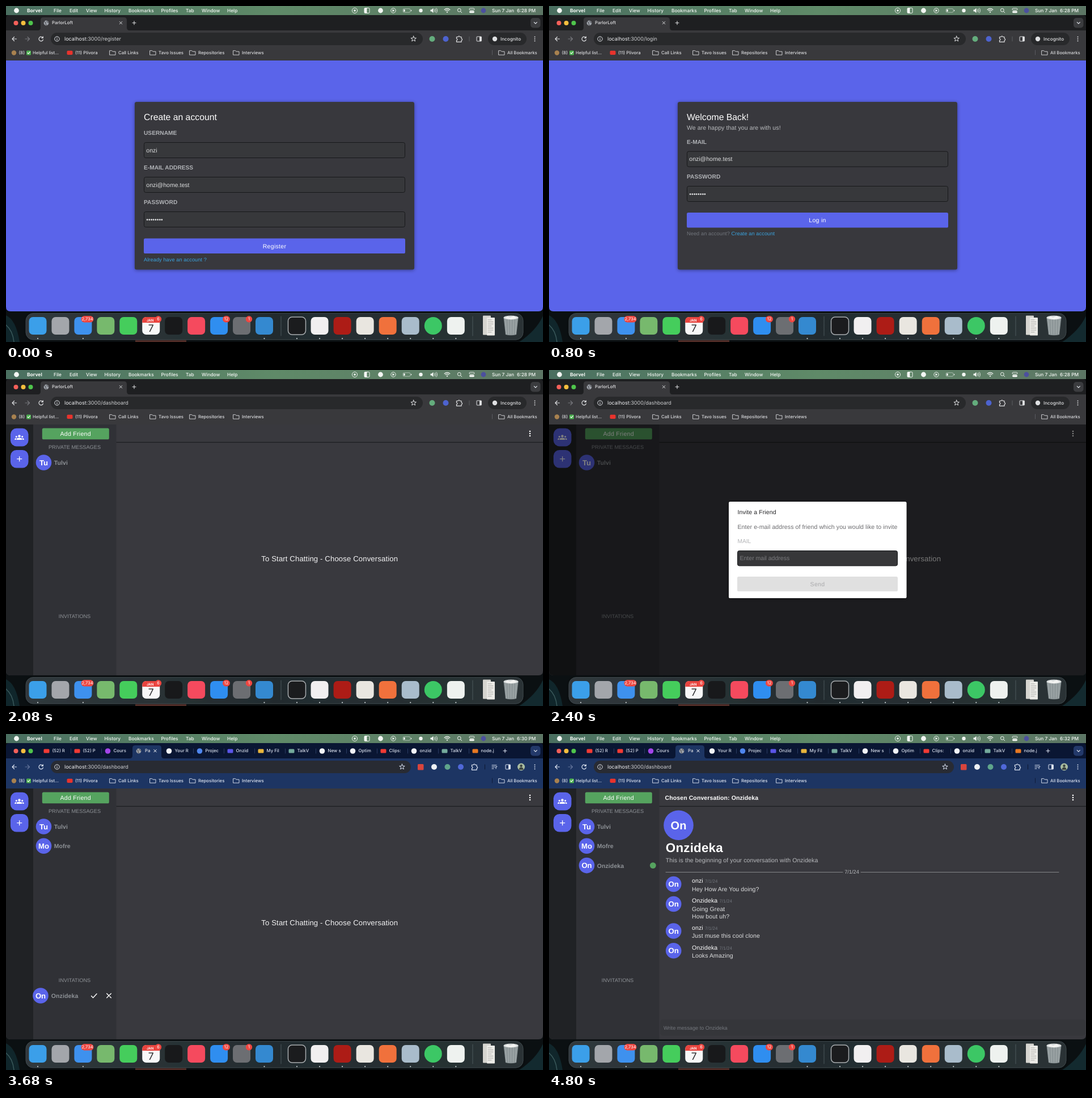
Write an HTML page that moves like this. It is 947 px wide and 592 px high and loops after 5.6 s.

```html
<!DOCTYPE html>
<html lang="en">
<head>
<meta charset="utf-8">
<title>Chat app walkthrough</title>
<style>
  html, body { margin: 0; width: 100%; height: 100%; overflow: hidden; background: #0b1012; }
  svg { display: block; width: 947px; height: 592px; }
  text { font-family: "Liberation Sans", Arial, sans-serif; text-rendering: geometricPrecision; white-space: pre; }
  .ui { font-family: Inter, sans-serif; }
  .body { letter-spacing: .00938em; }
  .btn { letter-spacing: .02857em; }
  .mid { text-anchor: middle; }
  .bold { font-weight: 700; }
  .semi { font-weight: 600; }
  .med { font-weight: 500; }
  .line { fill: none; stroke-linecap: round; stroke-linejoin: round; }
  .scene { visibility: hidden; animation: show 5.6s step-end calc(var(--i) * .8s - 5.6s) infinite; }
  @keyframes show {
    0% { visibility: visible; }
    14.2857%, 100% { visibility: hidden; }
  }
</style>
</head>
<body>
<svg id="stage" viewBox="0 0 947 592">
  <defs>
    <linearGradient id="bar">
      <stop offset="0" stop-color="#4a6f60"/><stop offset=".5" stop-color="#5f8a68"/><stop offset="1" stop-color="#5c7564"/>
    </linearGradient>
    <linearGradient id="dock">
      <stop offset="0" stop-color="#30383c"/><stop offset=".5" stop-color="#232c2f"/><stop offset="1" stop-color="#2a3235"/>
    </linearGradient>
    <filter id="soft" x="-10%" y="-20%" width="120%" height="150%">
      <feDropShadow dx="0" dy="1" stdDeviation="3" flood-opacity=".4"/>
    </filter>
  </defs>
</svg>
<script>
const BLURPLE = '#5a64ea', GREY = '#8e9297', SOFT = '#b9bbbe', PALE = '#dcddde', DARK = '#202225';

const rect = (x, y, w, h, fill, r = 0, more = '') =>
  `<rect x="${x}" y="${y}" width="${w}" height="${h}" rx="${r}" fill="${fill}" ${more}/>`;
const disc = (x, y, r, fill) => `<circle cx="${x}" cy="${y}" r="${r}" fill="${fill}"/>`;
const ring = (x, y, r, color, w = 1) =>
  `<circle cx="${x}" cy="${y}" r="${r}" fill="none" stroke="${color}" stroke-width="${w}"/>`;
const line = (d, color, w = 1) => `<path class="line" d="${d}" stroke="${color}" stroke-width="${w}"/>`;
const shape = (d, fill) => `<path d="${d}" fill="${fill}"/>`;
const text = (x, y, s, size, fill, cls = 'body') =>
  `<text x="${x}" y="${y}" font-size="${size}" fill="${fill}" class="${cls}">${s}</text>`;
const ui = (x, y, s, fill = '#e3e3e5', size = 7.8, cls = 'med') => text(x, y, s, size, fill, 'ui ' + cls);
const dots = (x, y, gap, r, color) => [-1, 0, 1].map(k => disc(x, y + k * gap, r, color)).join('');
const each = (list, fn) => list.map(fn).join('');

// Small interface icons
const folder = (x, color) => line(`M${x - 5} 78.7h3.6l1.4 1.5h5v6h-10z`, color, .9);
const globe = (x, y) => disc(x, y, 4.4, '#9ea3aa') +
  line(`M${x - 3} ${y - 2.4}q3 1 2 3t1.5 3M${x + 1.2} ${y - 3.6}q-.8 2.4 2.4 2.8`, '#3c3d41');
const cross = (x, y, r, color, w = 1) =>
  line(`M${x - r} ${y - r}l${2 * r} ${2 * r}M${x + r} ${y - r}l${-2 * r} ${2 * r}`, color, w);
const plus = (x, y, r, color, w = 1.1) => line(`M${x - r} ${y}h${2 * r}M${x} ${y - r}v${2 * r}`, color, w);
const star = (x, y, color) => {
  const p = Array.from({ length: 10 }, (_, k) => {
    const r = k % 2 ? 2.1 : 5, a = k * Math.PI / 5;
    return (x + r * Math.sin(a)).toFixed(2) + ' ' + (y - r * Math.cos(a)).toFixed(2);
  });
  return line('M' + p.join('L') + 'z', color);
};
const puzzle = (x, color) =>
  line(`M${x - 4.5} 54.5h2.8a1.5 1.5 0 0 1 3 0h2.8v3a1.5 1.5 0 0 1 0 3v2.8h-8.6v-2.8a1.5 1.5 0 0 0 0-3z`, color, 1.2);
const panel = (x, color) =>
  rect(x - 4, 54, 8.4, 8, 'none', .8, `stroke="${color}"`) + rect(x + 1, 54, 3.4, 8, color);

function menuBar(clock) {
  const items = [['File', 84], ['Edit', 112], ['View', 141], ['History', 173.5], ['Bookmarks', 216],
    ['Profiles', 273.5], ['Tab', 317], ['Window', 345], ['Help', 390]];
  const w = '#f4f7f4';
  return rect(0, 0, 947, 16, 'url(#bar)') + disc(18.5, 8, 4.4, w) +
    ui(37, 10.9, 'Borvel', w, 8.5, 'bold') +
    each(items, ([s, x]) => ui(x, 10.9, s, w, 8.3)) +
    ring(615, 8, 4.6, w, .9) + disc(615, 8, 1.8, w) +
    rect(632, 3.5, 9, 9, 'none', 1.5, `stroke="${w}"`) + rect(632, 3.5, 4.5, 9, w, 1) +
    disc(660.5, 8, 4.4, w) +
    ring(683, 8, 4.2, w, .9) + shape('M681.6 5.8v4.4l3.7-2.2z', w) +
    rect(700, 4.8, 13, 6.4, 'none', 2, `stroke="${w}" stroke-opacity=".6" stroke-width=".8"`) +
    rect(701.2, 6, 2.4, 4, w, .8) + rect(714, 6.8, 1.1, 2.4, w, .5) +
    disc(731.5, 8, 3.2, w) +
    shape('M748.5 6.4h2l3-2.6v8.4l-3-2.6h-2z', w) +
    line('M755.3 6q1.5 2 0 4M757.1 4.8q2.5 3.2 0 6.4M759 3.8q3.4 4.2 0 8.4', w, .8) +
    line('M773.2 6.5q4.8-4.2 9.6 0M775 8.4q3-2.4 6 0', w, 1.2) + disc(778, 10.6, 1.2, w) +
    ring(799.3, 7.3, 2.9, w) + line('M801.5 9.5l2.3 2.3', w) +
    rect(817, 4, 9, 3.4, 'none', 1.7, `stroke="${w}" stroke-width=".9"`) + rect(817, 8.7, 9, 3.6, w, 1.8) +
    disc(842, 8, 4.4, '#4c4f9e') +
    ui(857, 10.9, 'Sun 7 Jan', w, 8.3) + ui(901, 10.9, clock, w, 8.3);
}

function privateTab(c) {
  return shape('M56 43q5 0 5-5v-13q0-5 5-5h142q5 0 5 5v13q0 5 5 5z', c.bar) +
    globe(71, 30) + ui(81, 32.3, 'ParlorLoft') + cross(202.5, 29.7, 2.2, c.ink) +
    plus(226, 29.7, 3, c.ink);
}

function tabRow(c, dim) {
  const red = '#f23a34', white = '#f2f4f8', teal = '#74aa9c';
  const tabs = [['(52) R', red, 1], ['(52) P', red, 1], ['Cours', '#a445ea'], 0, ['Your R', white],
    ['Projec', '#4f86ee'], ['Onzid', '#5b55e8', 1], ['My Fil', '#e8b53c', 1], ['TalkV', teal, 1], ['New s', white],
    ['Optim', white], ['Clips:', red, 1], ['onzid', white], ['TalkV', teal, 1], ['node.j', '#e87922', 1]];
  const row = each(tabs, (tab, i) => {
    const x = 71.5 + i * 54;
    if (!tab) {
      return shape('M218 43q5 0 5-5v-13q0-5 5-5h41q5 0 5 5v13q0 5 5 5z', c.bar) + globe(234, 30) +
        (dim ? ring(249.5, 30, 3.8, '#e87d72') + disc(249.5, 30, 1.8, '#e87d72') : ui(245, 32.3, 'Pa')) +
        cross(263, 29.7, 2.2, '#fff');
    }
    const [label, color, square] = tab;
    return (square ? rect(x - 5, 26.5, 10, 7, color, 1.5) : disc(x, 30, 4.8, color)) +
      ui(x + 10, 32.3, label, '#d8dfec') + (i > 4 || i && i < 3 ? line(`M${x - 11} 26v8`, '#33466f', .8) : '');
  });
  return row + plus(880, 29.7, 3, dim ? '#6f7e9e' : c.ink);
}

function tools(c, blue, dim) {
  const k = c.ink;
  if (!blue) {
    return star(718.7, 58, k) + disc(751.5, 58, 5, '#64ad7d') + disc(775.5, 58, 5, '#4d63cf') + puzzle(799, k) +
      line('M817 54v8', '#66676b', .8) + panel(834, k) + rect(850, 47, 68, 22, c.pill, 11) +
      disc(862, 58, 4.2, k) + ui(872, 61, 'Incognito', k, 8.1);
  }
  const lit = '#d8e0f0';
  return (dim ? rect(672.5, 54.5, 7, 7, 'none', 1, `stroke="${lit}"`) + shape('M680 57.5l3-2v5l-3-2z', lit) : '') +
    star(698.5, 58, lit) + rect(726, 53, 10.5, 10.5, '#d9453d', 1.5) + disc(755, 58, 5, '#eef1f4') +
    disc(778.5, 58, 5, '#5fa58b') + disc(802, 58, 5, '#5068d8') + puzzle(826, k) + line('M844.5 54v8', '#0c1730') +
    line('M857 55h8M857 58h5M857 61h3M864 61v-3.5h2', k, 1.1) + panel(885, k) +
    disc(908.5, 58, 6.5, '#a9bca0') + disc(908.5, 56, 2.2, '#3d4440') + shape('M904.5 63a4 4.5 0 0 1 8 0z', '#3d4440');
}

function browser({ path, blue, dim }) {
  const c = blue
    ? { strip: '#0a1633', bar: '#1d3563', pill: '#282b33', ink: dim ? '#7485a8' : '#dfe6f4', mark: dim ? '#a5b2ca' : '#e1e7f3' }
    : { strip: '#1e1f21', bar: '#39393c', pill: '#28292b', ink: '#dedfe1', mark: '#dcdde0' };
  const lights = dim ? Array(3).fill('#2c3856') : ['#f4605a', '#f5be3e', '#4fc54c'];
  const marks = [['Call Links', 198], ['Tavo Issues', 269], ['Repositories', 339], ['Interviews', 416]];
  return shape('M0 22q0-6 6-6h935q6 0 6 6v22h-947z', c.strip) + rect(0, 43, 947, 53, c.bar) +
    each(lights, (f, i) => disc(17.5 + i * 13, 30, 4, f)) +
    (blue ? tabRow(c, dim) : privateTab(c)) +
    rect(925, 21, 17.5, 17.5, blue ? '#23396a' : '#3b3c3f', 5) + line('M931.3 28.7l2.5 2.5 2.5-2.5', '#e4e8ee', 1.2) +
    line('M18.5 58h-7.5m3.5-3.5l-3.5 3.5 3.5 3.5', c.ink, 1.2) +
    line('M34 58h7.5m-3.5-3.5l3.5 3.5-3.5 3.5', blue ? '#63749a' : '#77787c', 1.2) +
    line('M65 56a3.8 3.8 0 1 0 .4 3.2M65.3 53.8v2.6h-2.6', c.ink, 1.2) +
    rect(79, 47, blue ? 635 : 656, 22, c.pill, 11) +
    ring(90, 58, 4.2, '#dfe2e8') + line('M90 57.7v2.2M90 55.8v.1', '#dfe2e8', 1.1) +
    ui(103, 61.2, `localhost<tspan fill-opacity=".82">:3000/${path}</tspan>`, '#f0f1f4', 9.05, '') +
    tools(c, blue, dim) + dots(932.5, 58, 3.5, .95, c.ink) +
    disc(14, 82.5, 4.2, '#a8814f') + ui(22.5, 85, '(8)', c.mark) + rect(36, 78.5, 8, 8, '#4caf50', 1.5) +
    line('M38 82.5l1.5 1.6 2.7-3.3', '#fff', 1.1) + ui(47, 85, 'Helpful list...', c.mark, 7.7) +
    rect(107.5, 78.8, 10, 7.2, '#e8332d', 1.8) + ui(122, 85, '(11) Plivora', c.mark) +
    each(marks, ([s, x]) => folder(x - 10, c.mark) + ui(x, 85, s, c.mark)) +
    line('M857.5 78v8', blue ? '#0c1730' : '#64656a', .8) + folder(874, c.mark) + ui(884, 85, 'All Bookmarks', c.mark, 7.7);
}

function dock() {
  const apps = ['#3b9fe9', '#a3a6ab', '#3e91ee', '#77b96d', '#45cd5c', '', '#18191b', '#f54a5e', '#2f8ef0', '#6c6e72', '#3489d0',
    '#1b1c1e', '#f1eff0', '#ad1c16', '#e9e6e0', '#f0713c', '#a9bccb', '#3cc765', '#eef2ef'];
  const at = i => i < 11 ? 56 + i * 39.95 : 513 + (i - 11) * 40.05;
  const badge = (x, s, w) => rect(x - w / 2, 546, w, 11.4, '#ee4741', 5.7) + ui(x, 554.3, s, '#fff', 7.5, 'mid');
  const icon = (color, i) => {
    const x = at(i) - 15.5;
    if (!color) {
      return rect(x, 548, 31, 31, '#f8f8f8', 7) + shape(`M${x} 558v-3q0-7 7-7h17q7 0 7 7v3z`, '#e8443e') +
        ui(x + 14, 555.7, 'JAN', '#fff', 6.2, 'semi mid') + ui(x + 15.5, 574.2, '7', '#2b2b2d', 17.5, 'mid');
    }
    if (i === 17) return disc(at(i), 563.5, 15.5, color);
    return rect(x, 548, 31, 31, color, 7, i === 11 ? 'stroke="#a9adb0" stroke-width="1.5"' : '');
  };
  const open = [0, 2, 10, 11, 12, 13, 14, 15, 16, 17, 18];
  return rect(35, 541.5, 877, 46.5, 'url(#dock)', 13, 'stroke="#4a5559" stroke-width=".7" filter="url(#soft)"') +
    each(apps, icon) + each(open, i => disc(at(i), 585.8, 1.1, '#c9d0d2')) +
    line('M485 547v34M823 547v34', '#566267', .8) +
    badge(143.5, '2,734', 22) + badge(268.5, '6', 11.4) + badge(388.5, '12', 13) + badge(428.5, '1', 11.4) +
    rect(841, 545.5, 14, 34, '#d6d5d0', 1) + rect(848, 549, 14, 31.5, '#ebeae6', 1) +
    each([0, 1, 2, 3, 4, 5, 6], k => line(`M850 ${553 + k * 3.6}h${k % 3 ? 9 : 6}`, '#9a9a97', .8)) +
    shape('M877.5 549h26l-3.5 30q-9.5 2.5-19 0z', '#8d9698') +
    each([0, 1, 2, 3, 4], k => line(`M${881 + k * 4.7} 552l${1.4 - k * .7} 26`, '#b3babb', .7)) +
    `<ellipse cx="890.5" cy="549" rx="13" ry="3.6" fill="#d9dddd"/>` + shape('M880 550l4-3 5 2 6-3 6 4-10 2z', '#f4f4f2');
}

const desk = (page, opt) =>
  rect(0, 0, 947, 592, '#0b1012') +
  shape('M0 545q18 8 24 47h-24z', '#10262b') + line('M0 562q12 10 14 30', '#3b5a5c', 1.5) +
  shape('M905 592q30-20 42-46v46z', '#132a2f') + rect(228, 588.5, 90, 3.5, '#5c332d') +
  menuBar(opt.clock || '6:28 PM') + browser(opt) + page + dock();

// Page parts
const page = fill => shape('M0 96h947v434q0 8-8 8h-931q-8 0-8-8z', fill);
const label = (y, s) => text(243, y, s, 10.2, '#b0b2b6', 'bold');
const input = (y, s) => rect(243.5, y + .5, 460, 27, '#37383b', 3, 'stroke="#17181a"') + text(247.3, y + 17.5, s, 10.52, PALE, '');
const button = (y, s) => rect(243, y, 461, 26.5, BLURPLE, 2.6) + text(473.5, y + 17, s, 10.52, '#fff', 'btn mid');
const form = inner => page(BLURPLE) + rect(227, 169, 493, 295.5, '#39393d', 3.3, 'filter="url(#soft)"') + inner;
const avatar = (x, y, s, r = 13.8, size = 13.15) =>
  disc(x, y, r, BLURPLE) + text(x, y + size * .36, s, size, '#fff', 'bold mid');

const EMAIL = 'onzi@home.test', FRIEND = 'Onzideka', SECRET = '•'.repeat(8);

const register = form(
  text(243, 201, 'Create an account', 15.78, '#fff', '') +
  label(227, 'USERNAME') + input(240, 'onzi') +
  label(288, 'E-MAIL ADDRESS') + input(301, EMAIL) +
  label(349, 'PASSWORD') + input(362, SECRET) +
  button(409.5, 'Register') + text(243, 449.5, 'Already have an account ?', 9.2, '#3aa2dd'));

const login = form(
  text(243, 201, 'Welcome Back!', 15.78, '#fff', '') +
  text(243, 217.8, 'We are happy that you are with us!', 10.52, SOFT) +
  label(243, 'E-MAIL') + input(255.7, EMAIL) +
  label(304, 'PASSWORD') + input(317, SECRET) +
  button(364, 'Log in') +
  text(243, 404, 'Need an account? <tspan fill="#3aa2dd">Create an account</tspan>', 9.2, '#72767d'));

function dashboard(friends, main) {
  const people = disc(23.5, 116.5, 2.2, '#fff') + shape('M18.8 123v-1.5q0-2 4.7-2t4.7 2v1.5z', '#fff') +
    disc(18.3, 117.5, 1.5, '#fff') + disc(28.7, 117.5, 1.5, '#fff') +
    shape('M15.4 123v-1.2q0-1.8 3-1.8l-.8 3zM31.6 123v-1.2q0-1.8-3-1.8l.8 3z', '#fff');
  return page('#39393e') + rect(48, 96, 146.5, 442, '#303136') + shape('M0 96h48v442h-40q-8 0-8-8z', DARK) +
    rect(194.5, 126.8, 752.5, 1.3, '#1d1e21') +
    rect(7.9, 102.8, 31.6, 31.6, BLURPLE, 10.5) + people + rect(7.9, 140.9, 31.6, 31.6, BLURPLE, 10.5) +
    plus(23.7, 156.7, 4, '#fff', 1.3) +
    rect(63.8, 102.6, 118, 19.7, '#55a35f', 2.6) + text(122.7, 116.3, 'Add Friend', 10.52, '#fff', 'btn mid') +
    text(121, 139.3, 'PRIVATE MESSAGES', 9.2, GREY, 'mid') + text(121, 437, 'INVITATIONS', 9.2, GREY, 'mid') +
    each(friends, (s, i) => avatar(66.5, 163 + i * 34.3, s.slice(0, 2)) +
      text(84.7, 166.9 + i * 34.3, s, 10.52, GREY, 'body bold')) +
    dots(924, 112, 4, 1.3, '#fff') + main;
}

const prompt = text(570.7, 337.3, 'To Start Chatting - Choose Conversation', 13.15, '#f2f2f3', 'body mid');
const home = dashboard(['Tulvi'], prompt);

const invite = home + page('rgba(0,0,0,.5)') +
  rect(317, 232, 313.5, 170, '#fff', 2.6, 'filter="url(#soft)"') +
  text(332.5, 253.6, 'Invite a Friend', 10.52, '#232325') +
  text(332.5, 280, 'Enter e-mail address of friend which you would like to invite', 10.52, '#6a6a6d') +
  text(332.5, 304.8, 'MAIL', 10.2, '#b3b4b7', '') +
  rect(332.5, 318.5, 282, 26.5, '#373739', 3, 'stroke="#17181a"') + text(336.5, 335, 'Enter mail address', 10.52, '#7c7c7f', '') +
  rect(332, 364, 283, 26, '#e0e0e0', 2.6) + text(473.5, 380.8, 'Send', 10.52, '#a9a9ab', 'btn mid');

const invited = dashboard(['Tulvi', 'Mofre'], prompt +
  avatar(61, 461, FRIEND.slice(0, 2)) + text(79.8, 464.8, FRIEND, 10.52, GREY, 'body bold') +
  line('M150.5 461.5l3 3.2 6.5-7', '#fff', 1.4) + cross(181.5, 461, 3.8, '#fff', 1.4));

// The shared screen shows itself, a few levels deep
function call(depth) {
  const inner = depth
    ? `<g transform="translate(560.3 96) scale(.3166)">${call(depth - 1)}</g>` + shape('M793.5 232.5v4l1-.8 1.5.2z', '#8a8b8e')
    : '';
  const view = page(DARK) + rect(0, 96, 473.5, 187.3, '#000', 4) + rect(474, 96, 473, 187.3, '#000', 4) + inner +
    shape('M0 476q0-4 4-4h939q4 0 4 4v54q0 8-8 8h-931q-8 0-8-8z', BLURPLE) +
    rect(427.5, 498.5, 13, 10, '#fff', 1) + rect(458, 497.5, 4.5, 8, '#fff', 2.2) +
    cross(486.5, 504, 4.5, '#fff', 1.5) + rect(509, 499.5, 8, 8, '#fff', 1) + line('M506.5 498l11 11', '#fff', 1.3) +
    line('M933.5 511.5l-5 5M928.5 512.5v4h4M920.5 524.5l5-5M921.5 519.5h4v4', '#fff', 1.4) +
    rect(326, 502, 295, 32, '#202124', 2, 'filter="url(#soft)"') + line('M333.8 514.5v6M336.8 514.5v6', '#e6e7ea') +
    ui(344, 520.6, 'http://localhost:3000 is sharing your screen.', '#e6e7ea', 7.9) +
    rect(515.5, 506, 73.5, 23.5, '#a8c3f7', 11.75) + ui(552.2, 520.8, 'Stop sharing', '#12316b', 8.3, 'med mid') +
    ui(596, 520.6, 'Hide', '#a8c3f7', 7.9) + line('M596 522.5h17', '#a8c3f7', .7);
  return desk(view, { path: 'dashboard', blue: true, dim: true, clock: '6:31 PM' });
}

const messages = [
  [264.5, 'onzi', 'Hey How Are You doing?'], [299.5, FRIEND, 'Going Great', 'How bout uh?'],
  [347, 'onzi', 'Just muse this cool clone'], [381.7, FRIEND, 'Looks Amazing']];

const chat = dashboard(['Tulvi', 'Mofre', FRIEND],
  disc(183.3, 231.6, 5.4, '#55a35f') +
  text(204.5, 115.6, 'Chosen Conversation: ' + FRIEND, 10.52, '#fff', 'body bold') +
  avatar(228.5, 160.7, 'On', 26.3, 20) +
  text(205.8, 208, FRIEND, 22.36, '#fff', 'body bold') +
  text(205.8, 226, 'This is the beginning of your conversation with ' + FRIEND, 10.52, SOFT) +
  line('M206 243.5h312M550 243.5h349', '#97989b', .8) + text(534, 246, '7/1/24', 9.2, SOFT, 'mid') +
  each(messages, ([y, who, ...lines]) => avatar(219.7, y, 'On') +
    text(252, y - 2.2, `${who}<tspan dx="3.3" font-size="7.9" fill="#72767d">7/1/24</tspan>`, 10.52, '#fff') +
    each(lines, (s, i) => text(252, y + 12.2 + i * 12.8, s, 10.52, PALE))) +
  rect(196, 503, 750, 28.5, '#35363a', 5) + text(202, 520.7, 'Write message to ' + FRIEND, 9.2, '#74777d', ''));

const scenes = [
  desk(register, { path: 'register' }),
  desk(login, { path: 'login' }),
  desk(home, { path: 'dashboard' }),
  desk(invite, { path: 'dashboard' }),
  desk(invited, { path: 'dashboard', blue: true, clock: '6:30 PM' }),
  call(3),
  desk(chat, { path: 'dashboard', blue: true, clock: '6:32 PM' })
];
document.getElementById('stage').insertAdjacentHTML('beforeend',
  each(scenes, (s, i) => `<g class="scene" style="--i:${i}">${s}</g>`));
</script>
</body>
</html>
```
